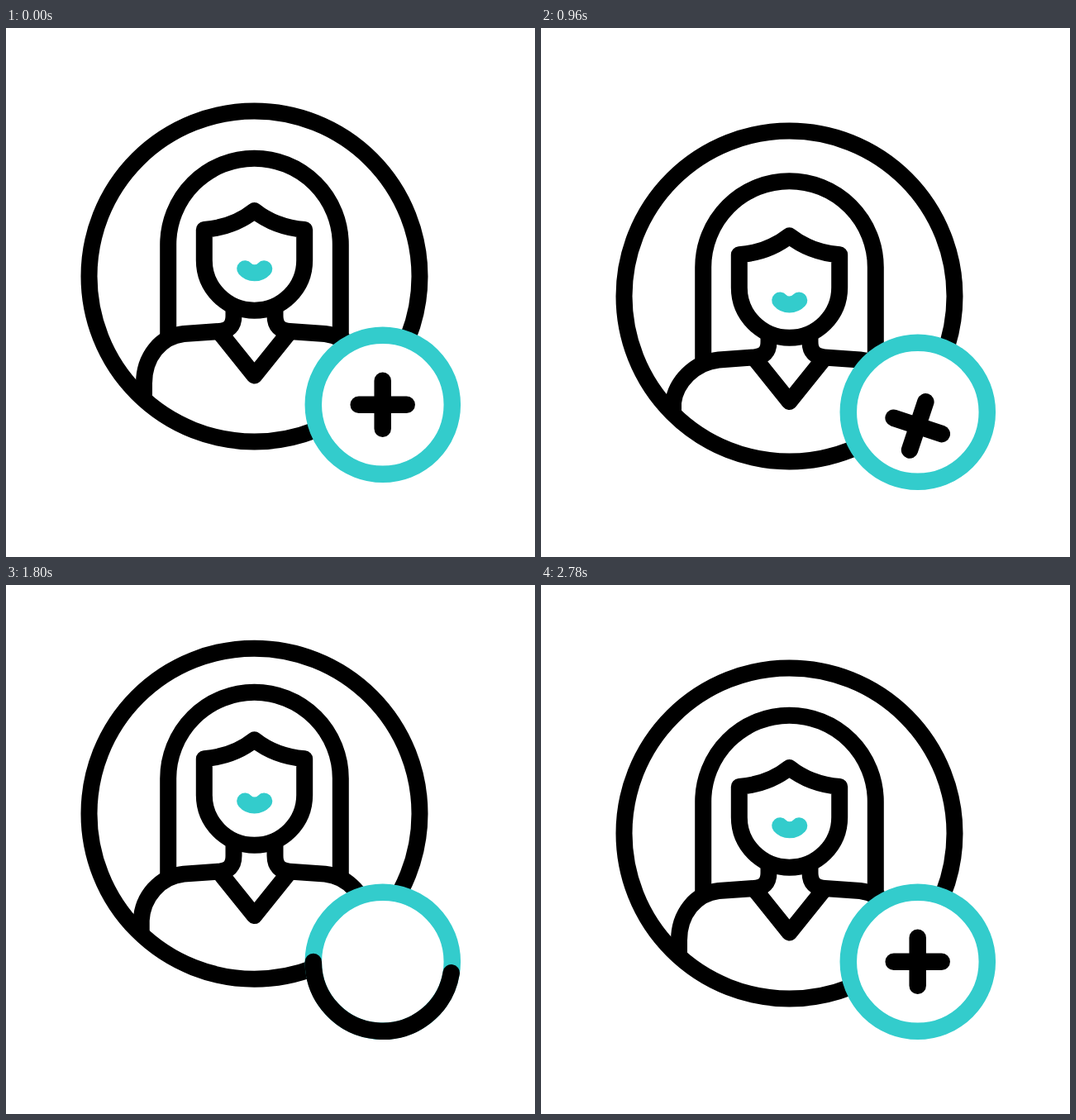
Animation of 640x640 px, one loop 3000 ms. Source, as an HTML page:

```html
<!DOCTYPE html>
<html lang="en">
<head>
<meta charset="utf-8">
<title>Add user</title>
<style>
  html, body { margin: 0; height: 100%; overflow: hidden; background: #fff; }
  svg { display: block; width: 100vw; height: 100vh; }
  .line { fill: none; stroke: #000; stroke-width: 20; stroke-linecap: round; stroke-linejoin: round; }
  .white { fill: #fff; }
  .teal { stroke: #3cc; }
</style>
</head>
<body>
<svg viewBox="0 0 640 640">
  <defs>
    <clipPath id="disc"><circle cx="300.5" cy="300.5" r="202"/></clipPath>
    <clipPath id="hole"><circle cx="456" cy="456" r="80"/></clipPath>
  </defs>
  <g id="avatar">
    <g clip-path="url(#disc)">
      <g id="body">
        <path id="hair" class="line" style="stroke-linecap:butt"/>
        <path id="torso" class="line"/>
        <path class="line" d="M259.5 369.5L300.5 420.5L341.5 369.5"/>
        <path id="face" class="line white"/>
        <path id="lips" class="line teal" d="M289.2 291.3C295 298 306 298 312.3 291.3"/>
      </g>
    </g>
    <circle class="line" cx="300.5" cy="300.5" r="200"/>
  </g>
  <g id="badge">
    <circle cx="455.8" cy="455.8" r="84" fill="#fff"/>
    <g clip-path="url(#hole)"><path id="plus" class="line" style="stroke-width:20.5"/></g>
    <circle class="line teal" cx="455.8" cy="455.8" r="84" style="stroke-width:20.5"/>
    <path id="arc" class="line" style="stroke-width:20.5"/>
  </g>
</svg>
<script>
const el = id => document.getElementById(id);
const set = (id, name, value) => el(id).setAttribute(name, value);
const shift = (id, y) => set(id, 'transform', `translate(0 ${y})`);
const clamp = x => Math.min(1, Math.max(0, x));

// Sine-eased interpolation through key times and values
function track(t, times, values) {
  if (t <= times[0]) return values[0];
  for (let i = 1; i < times.length; i++) {
    if (t < times[i]) {
      const p = (t - times[i - 1]) / (times[i] - times[i - 1]);
      return values[i - 1] + (values[i] - values[i - 1]) * (1 - Math.cos(Math.PI * p)) / 2;
    }
  }
  return values[values.length - 1];
}

const nod = [200, 700, 1180, 1700, 2280, 2780];

function drawAvatar(t) {
  const body = track(t, nod, [0, 0, 13, 2.8, 12, 0]);
  const hair = track(t, nod, [0, -25, 12, -9, 11.5, 0]);
  const bang = track(t, nod, [0, -21, 14, -15.5, 14.5, 0]);
  const chin = track(t, nod, [0, -12, 12, -8, 11.5, 0]);
  const lips = track(t, nod, [0, -18.7, 26, -12, 23.7, 0]);

  shift('avatar', track(t, [200, 870, 1900, 2590], [0, 25, -25, 0]));
  shift('body', body);
  shift('lips', lips);
  set('hair', 'd', `M196.2 374V${262 + hair}a104.3 104.3 0 0 1 208.6 0V374`);

  // Shoulder ends slide along the big circle as the body sinks
  const y = 430 - 1.1 * body, end = 455 - 1.6 * body;
  const side = x => {
    const at = v => 300.5 + x * (300.5 - v);
    const edge = 167 - 0.95 * body;
    return `M${at(275.5)} 325V348C${at(275.5)} 361 ${at(269)} 366 ${at(258)} 367L${at(215)} 370` +
      `C${at(187 - 0.3 * body)} 373 ${at(edge + 0.4 * body)} 398 ${at(edge)} ${y}V${end}`;
  };
  set('torso', 'd', side(-1) + side(1));

  const top = 244 + bang, peak = 221 + bang, jaw = 281 + chin;
  set('face', 'd', `M239.8 ${top}C263 ${top - 2} 283 ${top - 9} 300.5 ${peak}` +
    `C318 ${top - 9} 338 ${top - 2} 361.2 ${top}V${jaw}A60.7 60.7 0 0 1 239.8 ${jaw}Z`);
}

function drawBadge(t) {
  shift('badge', track(t, [200, 670, 1180], [0, 23, 0]));

  // The plus drops out at the bottom and comes back in from the top
  const half = track(t, [200, 680, 1100], [29, 35.7, 29]);
  let drop = 0, turn = 0;
  if (t < 1600) {
    const p = Math.max(0, t - 730) / 470;
    drop = 99 * p ** 2.5;
    turn = 66 * p ** 1.8;
  } else {
    const p = Math.max(0, 2700 - t) / 640;
    drop = -86 * p ** 3.22;
    turn = -51 * p ** 2;
  }
  set('plus', 'd', `M${-half} 0H${half}M0 ${-half}V${half}`);
  set('plus', 'transform', `translate(455.7 ${455.7 + drop}) rotate(${turn})`);

  // Black stroke runs one and a half turns, from bottom to top
  const p = clamp((t - 1205) / 900);
  if (p === 0 || p === 1) return set('arc', 'd', '');
  const tail = 90 + 540 * p ** 1.6;
  const head = 90 + 540 * (1 - (1 - p) ** 1.65);
  const point = deg => {
    const a = deg * Math.PI / 180;
    return `${455.8 + 84 * Math.cos(a)} ${455.8 + 84 * Math.sin(a)}`;
  };
  set('arc', 'd', `M${point(tail)}A84 84 0 ${head - tail > 180 ? 1 : 0} 1 ${point(head)}`);
}

function frame(now) {
  const t = now % 3000;
  drawAvatar(t);
  drawBadge(t);
  requestAnimationFrame(frame);
}
frame(performance.now());
</script>
</body>
</html>
```
